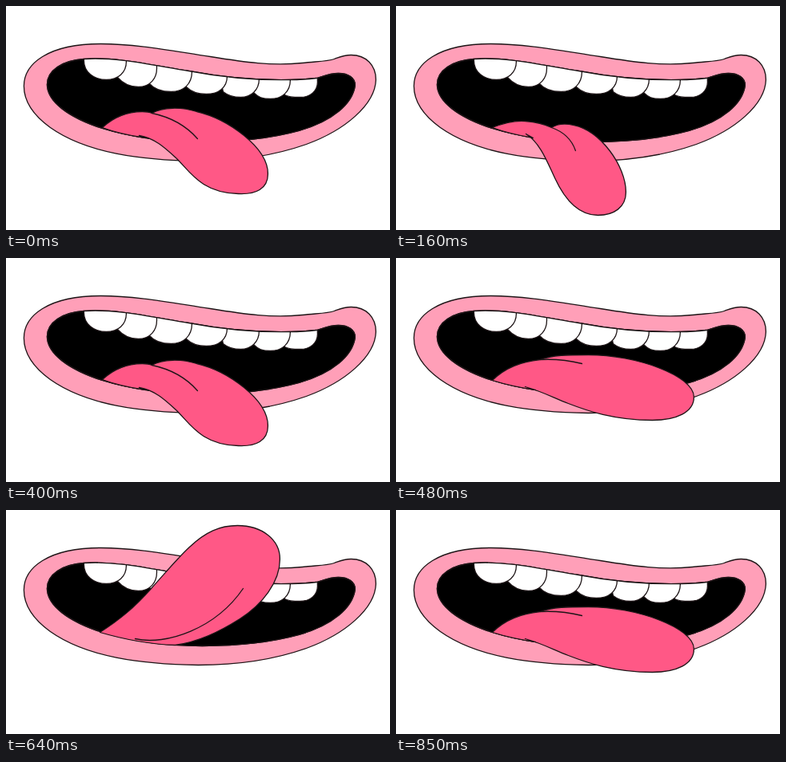
An HTML page that plays this animation: 480x281 px, repeating every 0.93 s.

```html
<!DOCTYPE html>
<html lang="en">
<head>
<meta charset="utf-8">
<title>Wagging tongue</title>
<style>
  html, body { margin: 0; width: 100%; height: 100%; overflow: hidden; background: #fff; }
  svg { display: block; width: 100%; height: 100%; }
  path { stroke: #1d1416; stroke-width: 1.3; stroke-linejoin: round; stroke-linecap: round; }
  .line { fill: none; }
</style>
</head>
<body>
<svg viewBox="0 0 480 281">
  <defs>
    <clipPath id="inside"><use href="#hole"/></clipPath>
  </defs>
  <g transform="translate(.4 .5)">
    <path fill="#ff9fb8" d="M22 100C22 72 52 47 118 47C166 47 213 57 255 63C298 70 332 75 370 71C388 69 402 69 410 66C418 63 422 61 431 61C450 61 462 74 462 92C461 123 424 155 375 173C327 190 281 194 240 194C168 193 100 184 55 152C33 136 22 119 22 100Z"/>
    <path id="hole" d="M51 98C51 80 70 68 97 66C138 63 184 74 228 81C270 89 312 93 356 92C370 92 379 91 388 90C398 87 405 84 415 84C428 84 436 90 436 99C433 122 408 144 366 156C326 167 286 170 245 170C200 170 155 164 120 153C77 139 51 119 51 98Z"/>
    <g fill="#fff" clip-path="url(#inside)">
      <path d="M340 60L348 111C353 114 360 114 367 114C380 114 389 106 389 95L388 60Z"/>
      <path d="M301 60L309 108C315 114 320 116 330 116C345 116 355 107 355 92L355 60Z"/>
      <path d="M262 60L271 107C277 112 284 114 293 114C306 114 316 105 316 91L316 60Z"/>
      <path d="M218 60L225 101C232 108 240 110 250 110C266 110 276 101 276 88L276 60Z"/>
      <path d="M172 60L179 97C185 104 195 107 206 107C222 107 232 97 232 82L232 60Z"/>
      <path d="M131 60L139 89C146 97 155 101 165 101C180 101 189 90 188 75L188 60Z"/>
      <path d="M97 60L97 68C97 82 109 92 125 92C140 92 150 83 150 69L150 60Z"/>
    </g>
    <use href="#hole" id="rim"/>
    <path id="tongue" fill="#ff5886"/>
    <path id="crease" class="line"/>
  </g>
</svg>
<script>
  const tongue = document.getElementById('tongue');
  const crease = document.getElementById('crease');

  // the rim is redrawn over the teeth as a bare outline
  const rim = document.getElementById('hole').cloneNode();
  rim.removeAttribute('id');
  rim.setAttribute('class', 'line');
  document.getElementById('rim').replaceWith(rim);

  // each pose: [outline, crease]
  const low = [
    'M120 152C134 139 152 132 170 132C176 132 180 133 182 134C196 126 219 126 238 132C277 141 327 177 327 210C327 229 312 236 290 235C243 234 229 206 212 190C198 177 185 165 166 162L174 165C154 162 136 158 120 152Z',
    'M182 134C206 139 225 150 239 166'
  ];
  const hang = [
    'M120 152C135 146 148 143 161 144C175 145 186 148 194 152C203 146 213 147 222 149C255 156 287 200 287 233C287 252 272 262 252 262C225 262 209 239 198 215C189 196 180 171 162 160L171 165C154 162 136 158 120 152Z',
    'M194 152C211 158 220 169 224 181'
  ];
  const flat = [
    'M120 153C136 137 158 129 180 127C195 121 215 121 240 121C300 121 372 147 372 174C372 193 350 203 320 203C272 203 238 191 215 182C195 174 182 167 161 161L174 165C154 162 136 158 120 153Z',
    'M180 127C200 126 216 128 232 132'
  ];
  const lick = [
    'M117 153C150 135 172 123 200 103C220 88 235 76 249 65C270 48 285 40 311 40C340 40 363 57 363 80C363 104 338 125 308 138C275 152 240 165 211 169C180 168 148 162 117 153Z',
    'M161 161C200 172 272 154 315 112'
  ];
  const high = [
    'M117 153C142 137 160 122 182 97C200 77 214 60 229 46C249 27 267 19 289 19C320 19 342 37 342 61C342 90 320 118 292 136C265 153 240 165 211 169C180 168 148 162 117 153Z',
    'M161 161C200 170 262 148 296 98'
  ];

  function mix(a, b, t) {
    return a.map((path, i) => {
      const to = b[i].match(/\d+/g);
      let n = 0;
      return path.replace(/\d+/g, v => (+v + (to[n++] - v) * t).toFixed(1));
    });
  }

  const steps = [
    [0, low], [80, mix(low, hang, 0.5)], [160, hang], [240, mix(low, hang, 1.33)],
    [320, hang], [400, low], [480, flat], [560, lick],
    [640, high], [770, lick], [850, flat]
  ];
  const loop = 930;

  function draw(ms) {
    const [, pose] = steps.findLast(([start]) => start <= ms % loop);
    tongue.setAttribute('d', pose[0]);
    crease.setAttribute('d', pose[1]);
  }

  const begin = performance.now();
  function tick() {
    draw(performance.now() - begin);
    requestAnimationFrame(tick);
  }
  tick();
</script>
</body>
</html>
```
